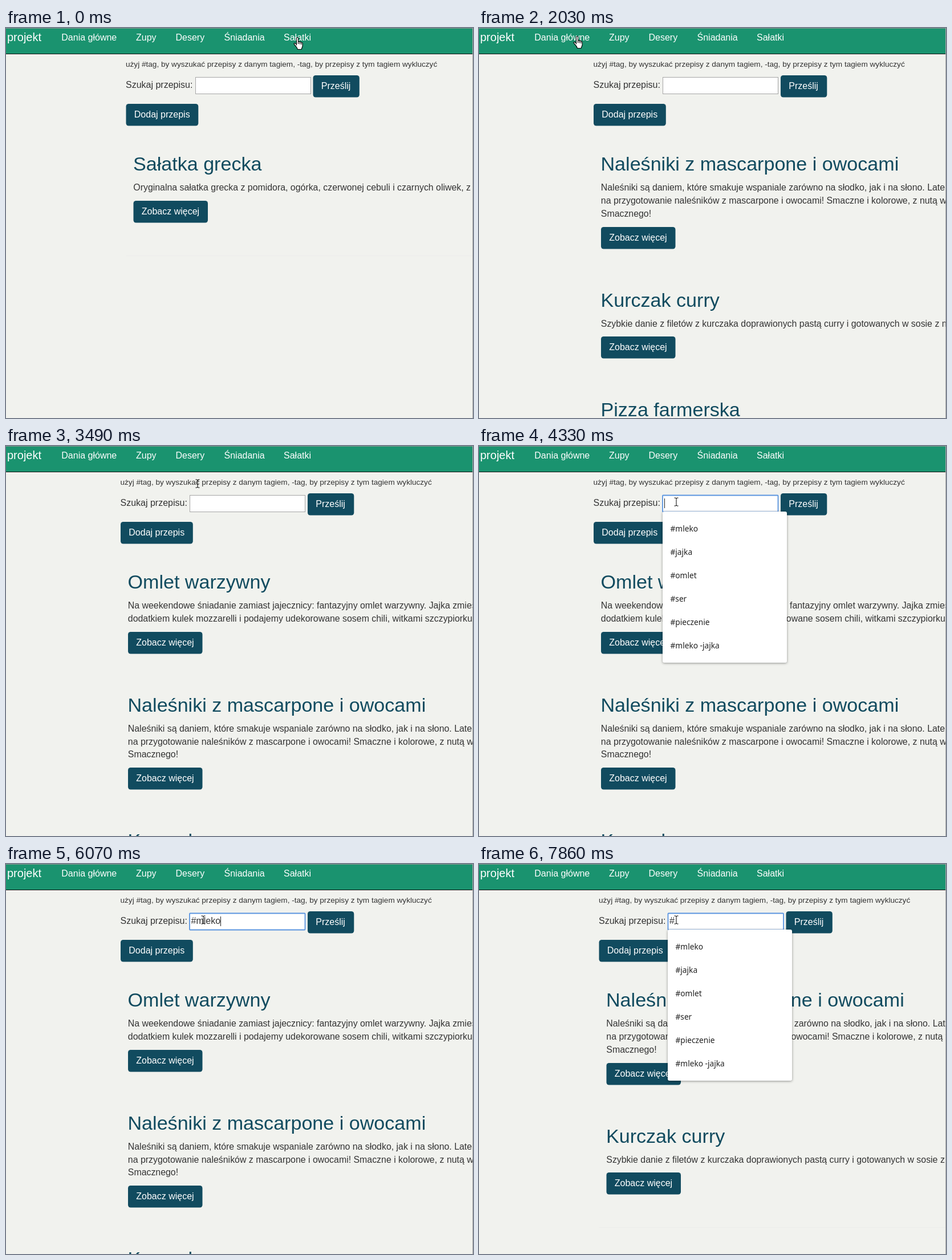
Recreate the animation shown at these times as an HTML page. Size 819 by 684 pixels, loop 8000 ms.

```html
<!DOCTYPE html>
<html lang="pl">
<head>
<meta charset="utf-8">
<title>Przepisy</title>
<style>
  html, body { margin: 0; width: 100%; height: 100%; overflow: hidden; background: #f1f2ee; }
  svg { display: block; }
  text { font: 16px "Liberation Sans", Arial, sans-serif; fill: #333; }
  .light { fill: #fff; }
  .brand { font-size: 20px; }
  .hint { font-size: 13.6px; }
  .title { font-size: 34.1px; fill: #114b5f; }
  .about { font-size: 15.9px; }
  .option { font: 500 13.7px "Noto Sans", "Open Sans", sans-serif; fill: #222; }
  .list { fill: #fff; filter: drop-shadow(0 1px 2px rgba(0, 0, 0, .4)); }
  .hand, .arrow { fill: #fff; stroke: #000; stroke-width: 1.1; stroke-linejoin: round; }
  .beam { fill: none; stroke: #000; }
</style>
</head>
<body>
<svg width="819" height="684" viewBox="0 0 819 684">
  <g id="page"></g>
  <g id="cursor"></g>
</svg>
<script>
const LOOP = 8000;
const LINE = 22.86;

const recipes = {
  greek: ["Sałatka grecka",
    "Oryginalna sałatka grecka z pomidora, ogórka, czerwonej cebuli i czarnych oliwek, z"],
  soup: ["Zupa pomidorowa",
    "Tradycyjna zupa pomidorowa na bulionie z warzyw, podawana z makaronem i świeżą bazylią"],
  pancakes: ["Naleśniki z mascarpone i owocami",
    "Naleśniki są daniem, które smakuje wspaniale zarówno na słodko, jak i na słono. Latem",
    "na przygotowanie naleśników z mascarpone i owocami! Smaczne i kolorowe, z nutą wanilii",
    "Smacznego!"],
  curry: ["Kurczak curry",
    "Szybkie danie z filetów z kurczaka doprawionych pastą curry i gotowanych w sosie z mleka"],
  pizza: ["Pizza farmerska", ""],
  apples: ["Pieczone jabłka",
    "Pieczone jabłka z aromatyczną bezą z kisielem o smaku cytrynowym oraz farszem z wiśni",
    "elegancki deser, idealny na jesienne podwieczorki. Upieczone jabłka możemy udekorować",
    "cynamonem."],
  cheesecake: ["Sernik z karmelem i orzechami",
    "Sernik z karmelem i orzechami to doskonały pomysł na słodkie i nieco inne niż zazwyczaj",
    "idealnie podczas świątecznych dni. Połączenie sera z masą krówkową, Budyniem o smaku",
    "miłośnicy intensywnego, słodkiego smaku. Sprawdź nasz przepis na sernik z karmelem"],
  omelette: ["Omlet warzywny",
    "Na weekendowe śniadanie zamiast jajecznicy: fantazyjny omlet warzywny. Jajka zmieszane",
    "dodatkiem kulek mozzarelli i podajemy udekorowane sosem chili, witkami szczypiorku"],
};

// Pages tall enough to scroll sit further left.
const pages = {
  salads: [210.5, "greek"],
  soups: [210.5, "soup"],
  mains: [201, "pancakes", "curry", "pizza"],
  desserts: [201, "apples", "cheesecake"],
  home: [201, "omelette", "pancakes", "curry"],
  results: [210.5, "pancakes", "curry"],
};

const recent = ["#mleko", "#jajka", "#omlet", "#ser", "#pieczenie", "#mleko -jajka"];
const milk = ["#mleko", "#mleko -jajka", "#mleko jajka", "#mleko -kurczak", "#mleko #kurczak"];

// start, page, typed text (null = not focused), suggestions
const states = [
  [0, "salads", null, []],
  [790, "soups", null, []],
  [2030, "mains", null, []],
  [2650, "desserts", null, []],
  [3100, "home", null, []],
  [4190, "home", "", []],
  [4320, "home", "", recent],
  [4450, "home", "#", recent],
  [4980, "home", "#m", milk],
  [5250, "home", "#ml", milk],
  [5550, "home", "#mle", milk],
  [5700, "home", "#mlek", milk],
  [5830, "home", "#mleko", milk],
  [6070, "home", "#mleko", []],
  [6190, "results", null, []],
  [6900, "results", "", recent],
  [7300, "results", "#", recent],
];

// first step, last step, number of steps, end x, end y
const moves = [
  [120, 510, 4, 253, 2],
  [940, 1620, 5, 172, 14],
  [2180, 2500, 3, 322, 14],
  [2850, 2850, 1, 222, 17],
  [2970, 2970, 1, 11, 7],
  [3230, 3490, 3, 336, 66],
  [3640, 4040, 4, 346, 98],
];

const shapes = {
  hand: `<g class="hand" transform="translate(-7)">
    <path d="M5.5 14V2a1.5 1.5 0 0 1 3 0V8q2-1 2.7.6 2-.7 2.6.7 2.2-.3 2.2 1.7V16q-1 3-2 5.5H7.5
      Q6.5 18 3 14.5.2 11.5 1.5 10.8 3 10 5.5 13Z"/>
    <path d="M8.5 8v4M11.2 9v3.5M13.8 10v3"/></g>`,
  arrow: `<path class="arrow" d="M.5.5v16l3.7-3.5 2.5 5.7 2.5-1-2.5-5.7h5.2Z"/>`,
  beam: `<path class="beam" d="M-3.5-7h2.5l1 1 1-1h2.5M0-6v12M-3.5 7h2.5l1-1 1 1h2.5"/>`,
};

const text = (x, y, s, cls = "") => `<text x="${x}" y="${y}" class="${cls}">${s}</text>`;
const rect = (x, y, w, h, fill, extra = "") =>
  `<rect x="${x}" y="${y}" width="${w}" height="${h}" fill="${fill}" ${extra}/>`;
const button = (x, y, w, label) =>
  rect(x, y, w, 38.57, "#114b5f", 'rx="4.5"') + text(x + 14.3, y + 24, label, "light");

const measure = document.createElement("canvas").getContext("2d");
measure.font = '16px "Liberation Sans", Arial, sans-serif';

function nav() {
  const links = [["Dania główne", 97.3], ["Zupy", 228], ["Desery", 297.5],
    ["Śniadania", 382.5], ["Sałatki", 487]];
  return rect(0, 0, 819, 45, "#1a936f") + rect(0, 45, 819, 1, "#101010") +
    rect(0, 0, 819, 1, "#84948e") + text(2, 23, "projekt", "light brand") +
    links.map(([label, x]) => text(x, 22, label, "light")).join("");
}

function recipe([title, ...lines], x, y) {
  const buttonY = Math.round(y + 30 + LINE * lines.length);
  return text(x - .5, y, title, "title") +
    lines.map((s, i) => text(x - .2, Math.round(y + 35 + i * LINE), s, "about")).join("") +
    button(x, buttonY, 130.5, "Zobacz więcej");
}

function searchBox(x, typed, caret) {
  const focused = typed !== null;
  let out = focused
    ? rect(x, 86.5, 202.5, 29, "#fff", 'rx="1" stroke="#5b95e0" stroke-width="1.8"')
    : rect(Math.round(x) + .5, 86.5, 202, 29, "#fff", 'stroke="#a6a6a6"');
  if (focused) {
    out += text(x + 2.5, 105, typed);
    if (caret) out += rect(Math.round(x + 2.5 + measure.measureText(typed).width), 92, 1, 17, "#222");
  }
  return out;
}

function suggestions(x, items) {
  if (!items.length) return "";
  return rect(x, 115, 218, 19 + 41 * items.length, "#fff", 'rx="3" class="list"') +
    items.map((s, i) => text(x + 13.5, 150 + 41 * i, s, "option")).join("");
}

function drawPage([, page, typed, items], caret) {
  const [x, ...names] = pages[page];
  let y = 250;
  let out = nav() +
    text(x - .5, 68, "użyj #tag, by wyszukać przepisy z danym tagiem, -tag, by przepisy z tym tagiem wykluczyć", "hint") +
    text(x - .5, 105, "Szukaj przepisu:") +
    searchBox(x + 121, typed, caret) +
    button(x + 328, 83, 81.3, "Prześlij") +
    button(x, 133, 126.8, "Dodaj przepis");
  for (const name of names) {
    const item = recipes[name];
    out += recipe(item, x + 13, y);
    y += 170 + LINE * (item.length - 1);
  }
  return out + rect(x, Math.round(y - 44), 608, 1, "#ececeb") +
    suggestions(Math.floor(x + 121), items) + rect(818, 0, 1, 684, "#a5a5a5");
}

function cursorAt(t) {
  let x = 511, y = 16;
  for (const [start, end, steps, toX, toY] of moves) {
    if (t < start) break;
    const gap = (end - start) / (steps - 1 || 1) || 1;
    const k = Math.min(1, (Math.floor((t - start) / gap + 1e-6) + 1) / steps);
    x += (toX - x) * k;
    y += (toY - y) * k;
  }
  return [Math.round(x), Math.round(y)];
}

const pageNode = document.getElementById("page");
const cursorNode = document.getElementById("cursor");
let shownState, shownCaret, shownShape;

function frame() {
  const t = performance.now() % LOOP;
  const state = states.findLast(s => s[0] <= t);
  const caret = (t - state[0]) % 1000 < 530;
  if (state !== shownState || caret !== shownCaret) {
    pageNode.innerHTML = drawPage(state, caret);
    shownState = state;
    shownCaret = caret;
  }
  const [x, y] = cursorAt(t);
  const shape = y < 30 ? "hand" : y < 50 ? "arrow" : "beam";
  if (shape !== shownShape) cursorNode.innerHTML = shapes[shownShape = shape];
  cursorNode.setAttribute("transform", `translate(${x} ${y})`);
  requestAnimationFrame(frame);
}
frame();
</script>
</body>
</html>
```
